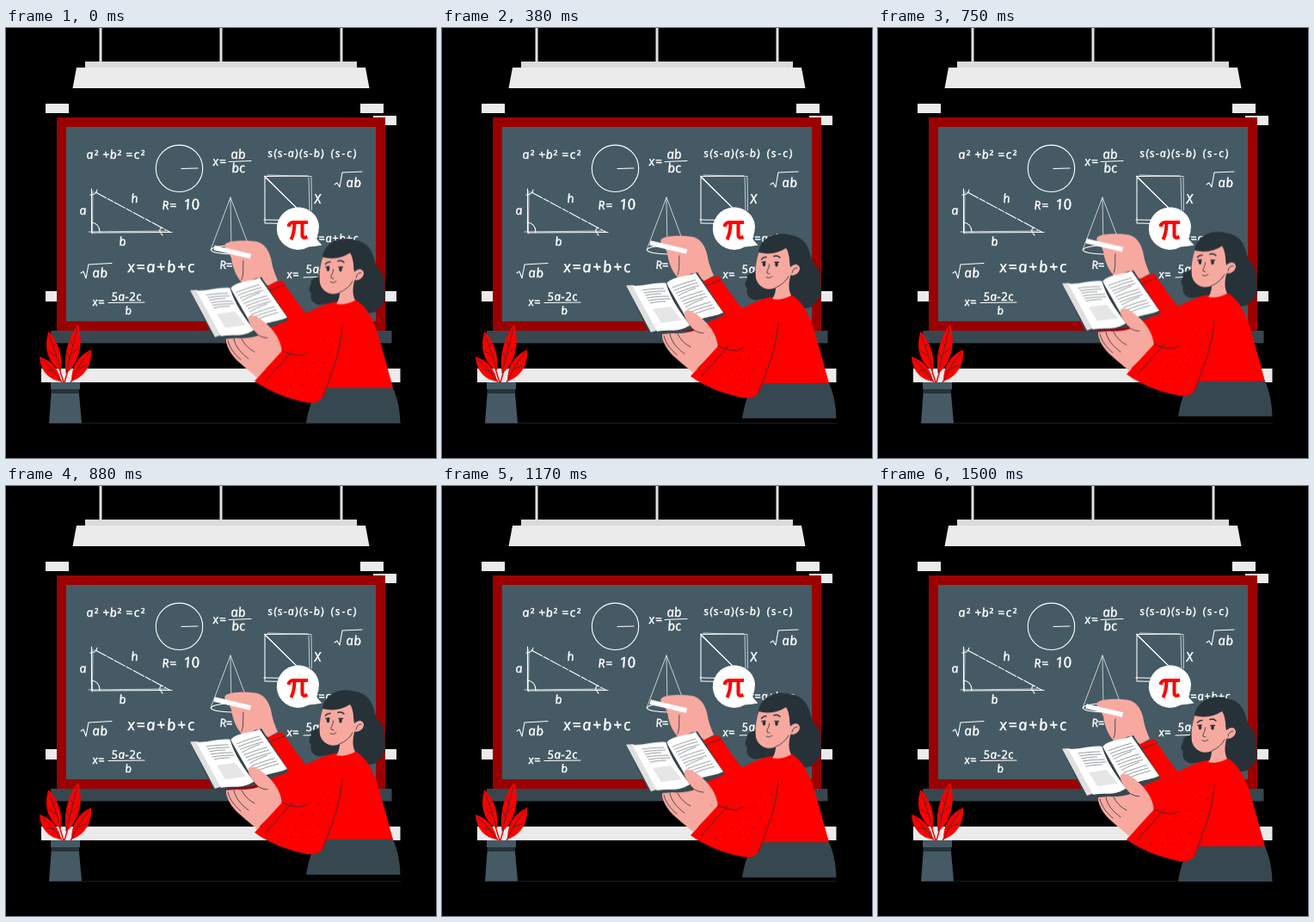
Animation of 500 by 500 pixels, one loop 1540 ms. Source, as an HTML page:

```html
<!DOCTYPE html>
<html lang="en">
<head>
<meta charset="utf-8">
<title>Maths lesson</title>
<style>
  html, body { margin: 0; width: 100%; height: 100%; overflow: hidden; background: #000; }
  svg { display: block; width: 100%; height: 100%; }
  .chalk text { font: italic 14px "Open Sans", Lato, sans-serif; fill: #fff; stroke: #fff; stroke-width: .45; }
  .chalk path, .chalk circle, .chalk ellipse { fill: none; stroke: #fff; stroke-width: 1.1; stroke-linecap: round; stroke-linejoin: round; }
  .chalk .thin { stroke-width: .7; }
  .light { fill: #ebebeb; }
  .slate { fill: #455a64; }
  .steel { fill: #37474f; }
  .ink { fill: #263238; }
  .red { fill: #f00; }
  .skin { fill: #f7a9a0; }
  .line { fill: none; stroke: #263238; stroke-width: .8; stroke-linecap: round; stroke-linejoin: round; }
  .bold { stroke-width: 1.5; }
  .float { animation: float 1540ms -40ms infinite; }
  @keyframes float {
    0% { transform: translateY(0); animation-timing-function: cubic-bezier(.4, .45, .6, 1); }
    50% { transform: translateY(-8.5px); animation-timing-function: cubic-bezier(.4, 0, .6, .55); }
    100% { transform: translateY(0); }
  }
</style>
</head>
<body>
<svg viewBox="0 0 500 500">
  <rect width="500" height="500"/>

  <!-- lamp -->
  <path d="M110 0V40M250 0V40M390 0V40" stroke="#e0e0e0" stroke-width="3"/>
  <path fill="#dbdbdb" d="M92 39H408V47H92Z"/>
  <path class="light" d="M82 46H418L422.500 70H77.500Z"/>

  <!-- board -->
  <path class="light" d="M46 88H73V99H46ZM412 88H439V99H412ZM427 102H454V113H427ZM46 306H62V318H46ZM438 306H454V318H438Z"/>
  <path fill="#9b0000" d="M59 104H441V352H59Z"/>
  <path class="slate" d="M70 115H430V341H70Z"/>
  <path class="steel" d="M52 352H448.500V366.500H52Z"/>
  <path class="light" d="M41 396H458.500V412H41Z"/>
  <path d="M50 459.500H459" stroke="#263238" stroke-width=".6"/>

  <g class="chalk">
    <g id="words"></g>
    <circle cx="201.500" cy="163.300" r="27.200"/>
    <path d="M204 163.500L223 163"/>
    <path d="M259 155.500L285 154.500M382 182L385 180L388 185L391 168L414 167"/>
    <path d="M300.500 172.500L351 172M301 172V226M301 173L352 223M300 223L328 223.500M301 227L326 227.500"/>
    <path class="thin" d="M304 171L355 172.500L355.500 212M352 174L353 212M303 174L340 211"/>
    <path d="M99.500 187V238L193 237.500M99 226Q109 227 109 238M98 194Q105 194 106 188M181 232Q176 235 182 241"/>
    <path d="M104 191L192 238" stroke-dasharray="14 2 7 2"/>
    <path class="thin" d="M101 190L100.500 239M96 237L186 236"/>
    <path d="M261 197L238 258M261 197L284 258M261 198L262 256" class="thin"/>
    <ellipse cx="262" cy="258" rx="23.500" ry="5"/>
    <path d="M87 285L90 283L93 291L96 275L123 273.500M119 319.500L161 319M346 290L374 289"/>
  </g>

  <!-- plant -->
  <path d="M67 412L62 396M68 412L72 398M65 412L61 406M75 412L80 405" stroke="#f00" stroke-width="1.500"/>
  <g class="red">
    <path d="M70 402C66 385 72 358 84 345C90 366 86 388 70 402Z"/>
    <path d="M64 398C50 391 43 373 49.500 353C62 366 66 383 64 398Z"/>
    <path d="M64 411C49 409 40 398 39 382C54 387 62 398 64 411Z"/>
    <path d="M76 411C76 393 84 381 99 374C100 392 92 405 76 411Z"/>
  </g>
  <path class="line" d="M70 401C74 384 79 365 83 349M63 396C60 384 55 370 50 357M63 409C57 400 49 391 41 385M77 409C82 396 90 385 97 377M74 385L71 378M75 380L84 372M78 369L75 364M58 381L50 376M55 371L57 367M55 399L47 397M84 396L93 393"/>
  <path class="slate" d="M53 420H84.500L88 459.500H50Z"/>
  <path class="ink" d="M53 419H85L84.800 425H53.200Z"/>
  <path class="slate" d="M52 412H86V420H52Z"/>

  <!-- speech bubble -->
  <path fill="#fff" d="M364 231C364 219 353 208.500 339.500 208.500A24.700 24.700 0 1 0 352 254.500Q360 254 367.500 252.500Q362 247 361 244Q364 238 364 231Z"/>
  <path fill="none" stroke="#f00" stroke-width="4" d="M328.500 231Q329.500 226 334 226H351M335.500 226Q335.500 238 331.500 246M344.500 226V241Q344.500 245 350.500 243"/>

  <g class="float">
    <!-- hair behind -->
    <path class="ink" d="M372 260C382 244 416 239 426 263C430 273 429 277 436 284C443 293 439 301 441 309C442 322 435 324 430 330C421 335 411 330 403 325L386 319C378 325 372 320 368 322C361 324 352 318 355 309C350 305 354 300 355 297C353 290 363 293 366 286Z"/>

    <!-- far arm and writing hand -->
    <path class="red" d="M304 300L321 294C330 306 339 321 349 332C360 327 374 319 386 319L398 365L350 390L322 378L304 351L315 342Z"/>
    <path class="line" d="M306 306L324 299"/>
    <path class="skin" d="M256 251C262 247 280 247 292 249C301 252 305 258 308 268C310 280 313 287 316 294L305 300C299 297 295 293 291 291L277 299C270 293 264 283 262 268L258 259C254 257 253 253 256 251Z"/>
    <path d="M242 256L284.500 266" stroke="#fff" stroke-width="5.500"/>
    <path class="line" d="M276 271C275 279 277 285 274 293"/>

    <!-- skirt and jumper -->
    <path class="steel" d="M363 418H449.500C456 432 458 446 458.500 460H349C351 446 356 430 363 418Z"/>
    <path class="red" d="M382 323C388 315 401 314 409 318C423 328 430 346 437 372L450 419H360L340 380C354 360 367 337 382 323Z"/>

    <!-- neck and face -->
    <path class="skin" d="M388 302L407 288C402 303 403 311 406 317C400 321 389 323 384 321Q389 315 388 302Z"/>
    <path class="skin" d="M370 263C365 275 364 288 365 297C367 306 377 313 388 308C397 304 402 298 404 293C411 296 417 289 416 284C414 279 409 280 405 284L403 260Z"/>
    <path class="ink" d="M368 267C370 251 387 242 405 247C423 249 430 265 427 280L416 292C418 283 413 277 405 284C404 276 404 268 400 262C391 268 380 270 368 267Z"/>
    <ellipse class="ink" cx="374.500" cy="280.500" rx="1.800" ry="2.700"/>
    <ellipse class="ink" cx="389" cy="281" rx="1.800" ry="2.700"/>
    <path class="line bold" d="M371.500 275Q374 272 377 272.500M386 271.500Q390 270 393 273M372 278.500L376 278M387 278.500L391.500 278.500"/>
    <path class="line" d="M380.500 281C381 286 377 288 378 291L381 292M377 296Q381 298 384 295M407 291Q408 285 413 285M388 308Q398 304 403 295"/>

    <!-- book -->
    <path class="steel" d="M214 306L262 303L297 290L329 340L288 357L241 361Z"/>
    <path fill="#e0e0e0" d="M214 305.500L222 305L252 357L243 360Z"/>
    <path fill="#fff" d="M221 305.500C235 307 248 301 261 303C265 320 278 338 289 351C276 361 263 356 250 359Z"/>
    <path fill="#fff" d="M261 303C270 294 283 296 295 291L327 337C315 343 300 341 289 352Z"/>
    <path fill="#e6e6e6" d="M245 333L266 330L279 346L255 349Z"/>
    <path class="line" d="M261 303C266 321 279 339 289 352"/>
    <g id="print" class="line"></g>

    <!-- holding hand -->
    <path class="skin" d="M256 362C255 369 262 382 272 390C280 397 286 402 292 407L321 378C320 362 310 350 300 342C293 336 285 332 282 336C280 342 288 352 294 358Q280 362 269 361Z"/>
    <path class="line" d="M258 364C260 373 266 380 273 386M265 362C267 372 274 379 282 385M274 362Q279 372 289 377M294 358Q299 361 304 361"/>

    <!-- near arm -->
    <path class="red" d="M321 376C328 379 336 382 344 381C357 369 365 343 383 330L396 340C395 367 382 399 371 425C367 436 359 437 350 436C329 432 307 424 289 411Z"/>
    <path class="line" d="M391 348C389 379 377 407 368 430M333 376L302 411M321 376C328 379 336 382 344 381L350 378"/>
    <g id="dots" fill="#d40000"></g>
  </g>
</svg>
<script>
  const add = (id, html) => document.getElementById(id).innerHTML += html;

  // upright handwriting: slanted letters skewed back
  const write = (str, x, y, size = 14, gap = 0) => add('words',
    `<text transform="translate(${x + 1} ${y}) skewX(8)" style="font-size:${size}px;letter-spacing:${gap}px">${str}</text>`);

  write('a²', 93, 152, 14, 1); write('+b²', 112, 152, 14, .5); write('=c²', 139, 152, 14, 1.5);
  write('R=', 181, 211, 14, 1); write('10', 206, 211, 17);
  write('x=', 240, 160, 14, 1); write('ab', 261, 152, 15); write('bc', 262, 168, 15);
  write('s(s-a)(s-b)', 304, 150, 12.5, 1.3); write('(s-c)', 377, 150, 12.5, 2);
  write('ab', 395, 185, 15, .5); write('X', 358, 204, 15);
  write('a', 85, 217); write('h', 145, 203); write('b', 131, 253);
  write('R=', 248, 280, 13);
  write('x=a+b+c', 141, 284, 18, 1.8); write('x=a+b+c', 356, 249, 13, .8);
  write('ab', 100, 290, 15, .5);
  for (const [x, y] of [[100, 323], [326, 291]]) {
    write('x=', x, y, 13, .5); write('5a-2c', x + 22, y - 6, 13.5, .5); write('b', x + 38, y + 10, 13);
  }

  const print = (x, y, w, rise) => add('print',
    `<path stroke-width=".5" stroke-dasharray="5 .8 3 .8" d="M${x} ${y}q${w / 2} ${-rise / 2 - 1} ${w} ${-rise}"/>`);
  for (let i = 0; i < 6; i++) print(233 + i * 1.8, 311 + i * 3, i % 3 == 2 ? 18 : 25, 2);
  for (let i = 0; i < 11; i++) print(268 + i * 2.2, 308 + i * 3.2, i % 4 == 3 ? 20 : 27, 9);

  // staggered dots across the sleeve
  for (let row = 0; row < 7; row++) {
    for (let col = 0; col < 6; col++) {
      const x = 318 + col * 13 + row % 2 * 6, y = 338 + row * 13;
      if (x + y > 728 && x + y < 785 && x < 386) add('dots', `<circle cx="${x}" cy="${y}" r="1.2"/>`);
    }
  }
</script>
</body>
</html>
```
